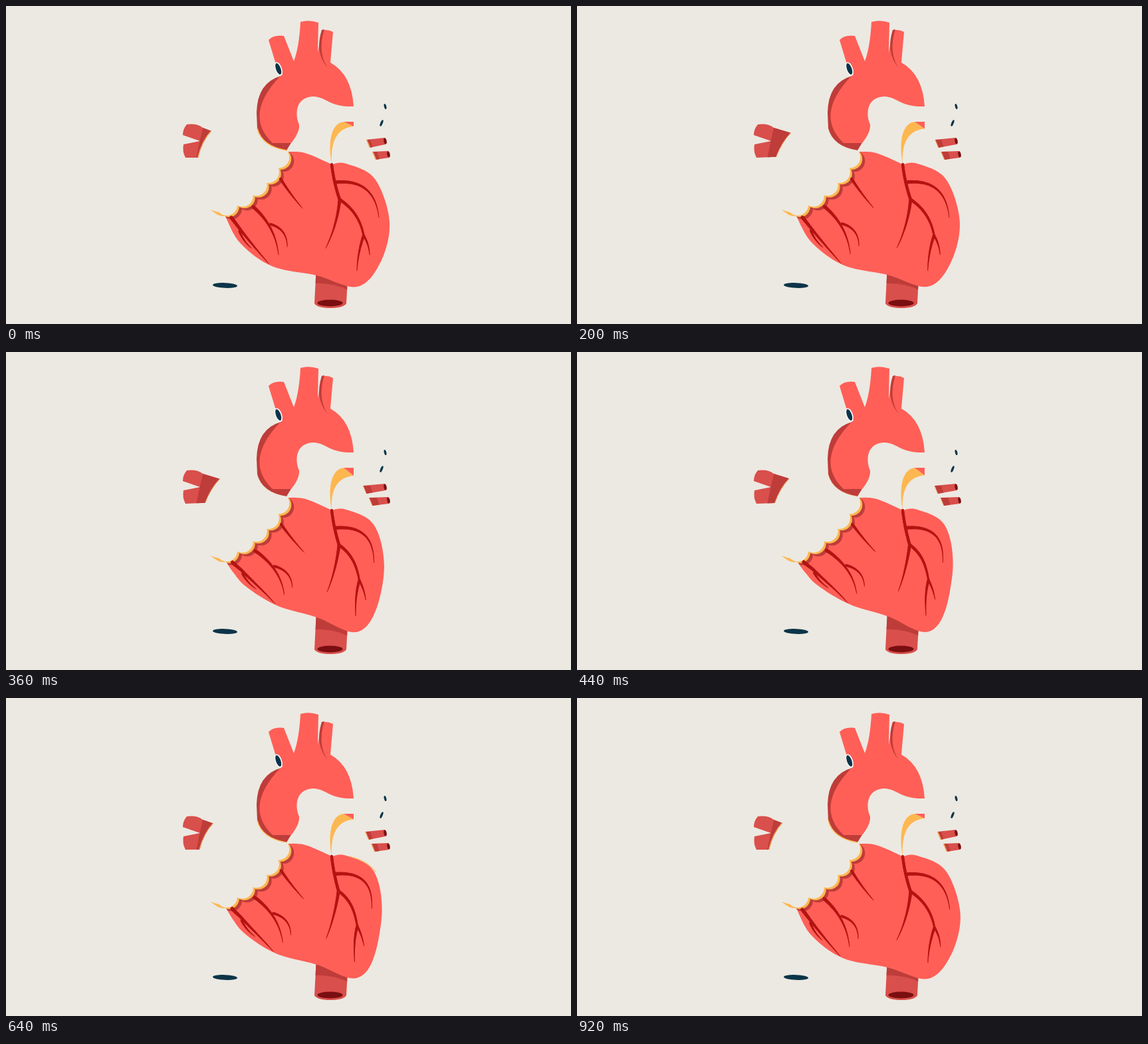
Recreate the animation shown at these times as an HTML page with a canvas. Size 850x478 px, loop 0.96 s.

```html
<!DOCTYPE html>
<html lang="en">
<head>
<meta charset="utf-8">
<title>Beating heart</title>
<style>
  html, body { margin: 0; width: 100%; height: 100%; overflow: hidden; background: #ece9e2; }
  canvas { display: block; width: 100vw; height: 100vh; }
</style>
</head>
<body>
<canvas id="stage" width="850" height="478"></canvas>
<script>
const ctx = document.getElementById('stage').getContext('2d');
const LOOP = 960, STEP = 40;
const PAPER = '#ece9e2', CORAL = '#ff5f57', ROSE = '#d94f4b', SHADE = '#be3c39';
const VEIN = '#b31412', HOLE = '#7a0e10', GOLD = '#fdb750', NAVY = '#0b3448';

// Eases from 0 up to 1 at the peak and back to 0.
function pulse(t, start, peak, end) {
  const u = t < peak ? (t - start) / (peak - start) : (end - t) / (end - peak);
  return Math.sin(Math.max(0, u) * Math.PI / 2) ** 2;
}

const clamp = v => Math.max(0, Math.min(1, v));
const quad = (a, b, c, u) => a * (1 - u) ** 2 + 2 * b * u * (1 - u) + c * u * u;
const bump = (x, y, cx, cy, r) => Math.exp(-((x - cx) ** 2 + (y - cy) ** 2) / (2 * r * r));

// Pulls both ventricle walls inwards.
const squeeze = (left, right) => ([x, y]) => {
  const l = left * bump(x, y, 400, 385, 60) * clamp((x + y - 620) / 60);
  const r = right * bump(x, y, 570, 343, 46);
  return [x + 11 * l - 13 * r, y - 11.5 * l - 2 * r];
};

// Samples a smooth curve through a few key points.
function smooth(keys) {
  const key = i => keys[Math.max(0, Math.min(keys.length - 1, i))];
  const points = [];
  for (let i = 0; i < keys.length - 1; i++) {
    for (let u = 0; u < 1; u += 0.1) {
      points.push([0, 1].map(k => {
        const [a, b, c, d] = [key(i - 1)[k], key(i)[k], key(i + 1)[k], key(i + 2)[k]];
        return b + u / 2 * (c - a + u * (2 * a - 5 * b + 4 * c - d + u * (3 * (b - c) + d - a)));
      }));
    }
  }
  return [...points, key(keys.length)];
}

function polygon(points) {
  const path = new Path2D();
  points.forEach(p => path.lineTo(...p));
  path.closePath();
  return path;
}

function fill(color, path) {
  ctx.fillStyle = color;
  ctx.fill(path instanceof Path2D ? path : new Path2D(path));
}

function line(color, width, path) {
  if (width <= 0) return;
  ctx.strokeStyle = color;
  ctx.lineWidth = width;
  ctx.stroke(new Path2D(path));
}

function oval(color, x, y, rx, ry = rx, turn = 0) {
  ctx.fillStyle = color;
  ctx.beginPath();
  ctx.ellipse(x, y, rx, ry, turn, 0, 7);
  ctx.fill();
}

function clipped(path, draw) {
  ctx.save();
  ctx.clip(path instanceof Path2D ? path : new Path2D(path));
  draw();
  ctx.restore();
}

// A bowed, tapering vein; longer ones start thicker.
function vein(warp, x0, y0, x1, y1, bow, tip = 0.8) {
  const dx = x1 - x0, dy = y1 - y0, length = Math.hypot(dx, dy);
  const cx = (x0 + x1) / 2 - 2 * bow * dy / length;
  const cy = (y0 + y1) / 2 + 2 * bow * dx / length;
  const at = u => warp([quad(x0, cx, x1, u), quad(y0, cy, y1, u)]);
  const width = 2.4 + length / 30, steps = 24;
  ctx.strokeStyle = VEIN;
  for (let i = 0; i < steps; i++) {
    ctx.lineWidth = width + (tip - width) * i / steps;
    ctx.beginPath();
    ctx.moveTo(...at(i / steps));
    ctx.lineTo(...at((i + 1) / steps));
    ctx.stroke();
  }
}

function drawVeins(warp) {
  vein(warp, 490, 238, 502, 291, 1.5, 4.5);
  vein(warp, 502, 291, 481, 364, -3.5);
  vein(warp, 502, 291, 538, 345, -7, 3);
  vein(warp, 538, 345, 528, 398, 2);
  vein(warp, 538, 345, 547, 374, -2);
  vein(warp, 495, 265, 561, 318, -21);
  vein(warp, 413, 260, 446, 304, 1);
  vein(warp, 372, 302, 410, 374, -8);
  vein(warp, 398, 328, 423, 362, -8);
  vein(warp, 339, 318, 396, 388, 1);
  vein(warp, 351, 338, 369, 364, 2);
}

// A row of round bites along a bent line, each with a gold and a dark crescent.
function drawScallops(body) {
  const bites = Array.from({ length: 5 }, (_, i) => {
    const u = (i + 0.5) / 5, turn = 0.5 + 0.7 * u;
    return [quad(424, 391, 322, u) - 8 * Math.cos(turn), quad(219, 285, 312, u) - 8 * Math.sin(turn)];
  });
  const layer = (color, shift) => bites.forEach(([x, y]) => oval(color, x + shift, y + shift * 0.8, 16));
  clipped(body, () => {
    layer(SHADE, 7);
    layer(GOLD, 3);
  });
  fill(GOLD, 'M308 306Q329 327 351 304Q330 316 308 306');
  layer(PAPER, 0);
}

function drawVentricles(warp, glow) {
  ctx.globalAlpha = glow;
  line(GOLD, 1.5, 'M492 238Q533 234 556 261');
  ctx.globalAlpha = 1;

  const wall = smooth([[330, 316], [352, 356], [400, 391], [467, 405], [528, 422],
    [563, 386], [577, 325], [555, 260], [512, 237], [490, 238]]);
  const top = smooth([[490, 238], [450, 221], [423, 219]]);
  const body = polygon([...wall, ...top].map(warp));
  fill(CORAL, body);
  drawScallops(body);
  drawVeins(warp);
}

function drawAorta(p) {
  const base = 'M378 184Q385 211 422 217';
  fill(SHADE, base + 'L430 204L414 105Q378 115 377 160Z');
  line(GOLD, 1.5 * (1 - p), base);
  fill(CORAL, 'M395 51Q403 43 418 45L433 83Q441 62 443 24Q456 20 470 25L469 70L475 37Q483 34 492 39'
    + 'L488 85Q520 103 523 151C485 152 484 137 462 136C436 137 434 162 441 178Q442 190 429 206'
    + 'L401 206Q357 164 412 106L416 103L405 84Z');
  fill(SHADE, 'M475 36Q464 70 484 93Q468 70 479 35Z');
  oval('#fff', 410, 94.5, 5, 10.5, -0.34);
  oval(NAVY, 409.7, 94.5, 3.6, 9, -0.34);
}

function drawLeftVessels(p) {
  const x = 14 * p, y = 3 * p;
  const edge = `M${309 + x} ${188 + y}Q${295 + x} ${203 + y} ${289 + 0.85 * x} ${228 - y / 2}`;
  const vessels = edge + 'L270 228Q265 219 267 208L292 203L266 194Q266 185 272 178Q287 176 296 183Z';
  fill(ROSE, vessels);
  clipped(vessels, () => {
    fill(SHADE, 'M298 176Q291 203 286 230H330V176Z');
    line(GOLD, 2 - p, edge);
  });
}

function drawRightVessels(p) {
  for (const i of [0, 1]) {
    const x = 542 + 9 * i - 5 * p, y = 201 + 18 * i, end = 570 + 5 * i, endY = 198 + 20 * i;
    const edge = `M${x + 5} ${y + 12}L${x} ${y}`;
    const pipe = `${edge}L${end} ${endY}Q${end + 3} ${endY + 5} ${end + 1} ${endY + 10}Z`;
    fill(ROSE, pipe);
    clipped(pipe, () => {
      fill(SHADE, `${edge}H${548 + 10 * i}l5 15Z`);
      line(GOLD, 2.4 - 1.4 * p, edge);
    });
    oval(HOLE, end + 0.5, endY + 5, 2.1, 4.6, -0.2);
  }
}

function drawPulmonaryRim(p) {
  const drop = 5 * p;
  fill(GOLD, `M490 237C484 205 489 176 508 174L523 ${181 + drop}`
    + `C500 ${183 + drop} 488 ${200 + drop} 490 237Z`);
  fill(CORAL, `M508 174H523V${181 + drop}Z`);
}

function drawLowerVessel() {
  const vessel = 'M467 390L464 447Q468 454 488 454Q508 454 512 447L515 390Z';
  fill(ROSE, vessel);
  clipped(vessel, () => fill(SHADE, 'M460 417Q495 415 518 429V380H460Z'));
  oval(HOLE, 487.5, 446.5, 19, 5);
}

function draw(t) {
  const leftAtrium = pulse(t, 0, 250, 800);
  const rightAtrium = pulse(t, 0, 320, 840);
  const leftVentricle = pulse(t, 130, 450, 880);
  const rightVentricle = 1.12 * pulse(t, 120, 540, 960);

  ctx.fillStyle = PAPER;
  ctx.fillRect(0, 0, 850, 478);
  ctx.lineCap = ctx.lineJoin = 'round';
  drawLowerVessel();
  drawVentricles(squeeze(leftVentricle, rightVentricle), pulse(t, 400, 760, 920));
  drawAorta(leftAtrium);
  drawPulmonaryRim(rightAtrium);
  drawLeftVessels(leftAtrium);
  drawRightVessels(rightAtrium);
  oval(NAVY, 329.5, 420, 18.5, 3.8, 0.04);
  oval(NAVY, 570.5, 151, 1.7, 4.2, -0.25);
  oval(NAVY, 565, 176, 1.7, 5.2, 0.4);
}

const start = performance.now();
function tick() {
  const t = (performance.now() - start) % LOOP;
  draw(Math.floor(t / STEP) * STEP);
  requestAnimationFrame(tick);
}
tick();
</script>
</body>
</html>
```
